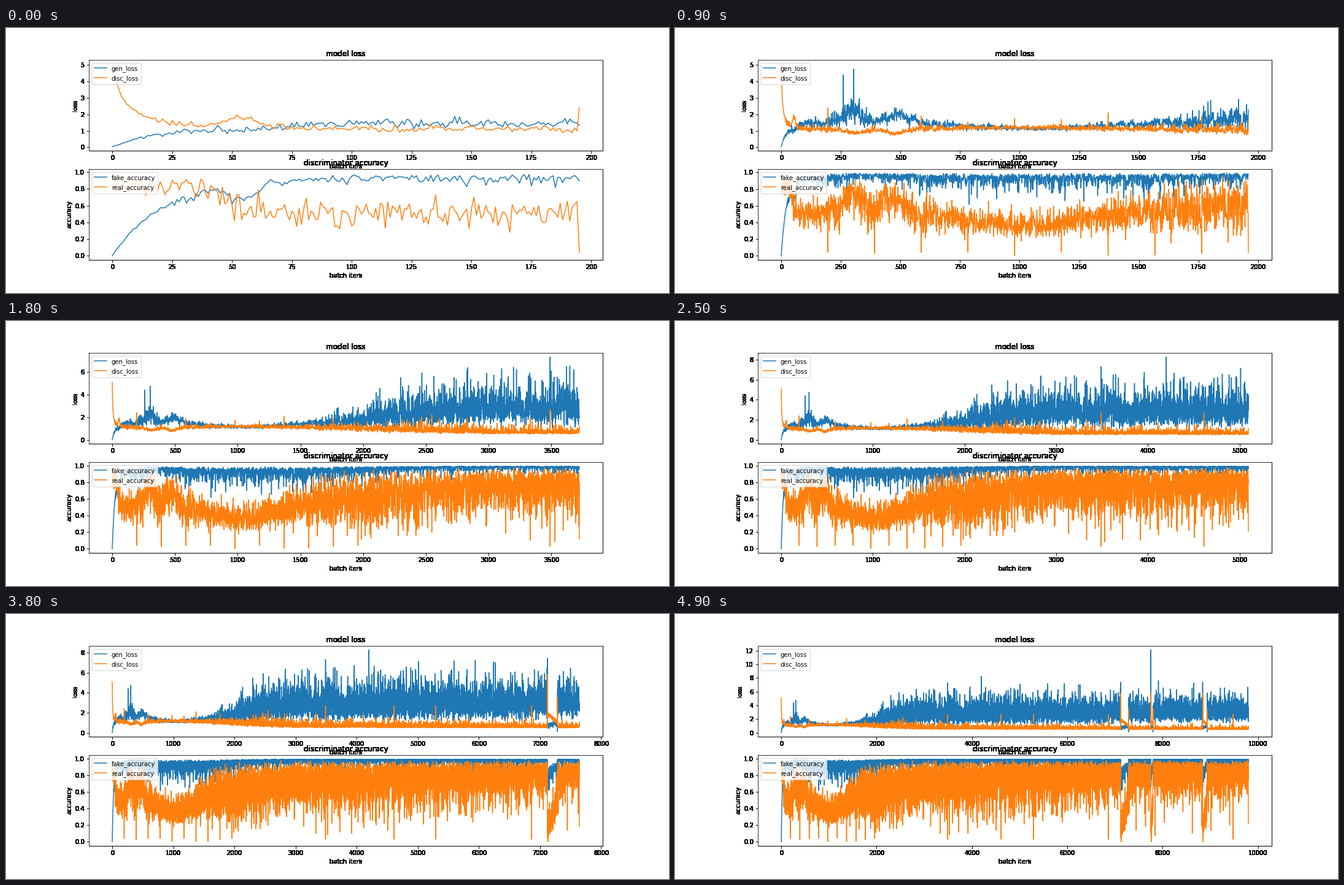
Write a matplotlib script that moves like this. It is 1080 by 432 pixels and loops after 5 s.

```python
import matplotlib.pyplot as plt
import numpy as np
from matplotlib.animation import FuncAnimation

EPOCH, EPOCHS = 196, 50
N = EPOCH * EPOCHS
x = np.arange(N)
rng = np.random.default_rng(12)


def bump(center, width):
    return np.exp(-((x - center) / width) ** 2)


def ramp(start, end):
    t = np.clip((x - start) / (end - start), 0, 1)
    return t * t * (3 - 2 * t)


def noise(size=N):
    return np.clip(rng.normal(size=size), -3, 3)


def logistic(v):
    return 1 / (1 + np.exp(-v))


def make_losses(drift):
    gen = (1.45 * (1 - np.exp(-(x + .8) / 28)) - .3 * bump(55, 12)
           + .65 * bump(300, 65) + .55 * bump(470, 50) + .2 * bump(570, 30)
           - .32 * bump(1060, 340) + 1.3 * ramp(1500, 3000) + .35 * ramp(3000, N))
    spread = (.1 + .08 * bump(290, 70) - .05 * bump(1050, 350)
              + .22 * ramp(1400, 2300) - .07 * ramp(4000, N))
    gen *= np.exp(.07 * drift + spread * noise())

    disc = (1.1 + 1.5 * np.exp(-x / 20) + 2.47 * np.exp(-x / 3.5) + .65 * bump(54, 9)
            - .22 * bump(320, 50) - .3 * bump(470, 45) + .1 * bump(1000, 350)
            - .4 * ramp(1400, 3500) - .1 * ramp(3500, N))
    spread = .15 - .07 * bump(1000, 350) + .4 * ramp(1400, 3000)
    spread *= 1 - np.exp(-x / 30)
    disc = .46 + (disc - .46) * np.exp(spread * noise() - .1 * drift)
    return gen, disc


def make_accuracies(drift):
    level = 2.6 + .7 * bump(380, 120) + 1.7 * ramp(1400, 3000)
    spread = .45 + .25 * ramp(100, 300) + .25 * ramp(1400, 3000)
    fake = logistic(level + .25 * drift + spread * noise())
    fake = fake * (1 - np.exp(-x / 22)) - (.15 + .06 * noise()) * bump(54, 8)

    level = (.1 + 1.5 * logistic((46 - x) / 3) + .95 * bump(310, 50) + .95 * bump(465, 50)
             - .65 * bump(1000, 340) + 1.05 * ramp(1300, 3000) + .6 * ramp(3000, N))
    spread = (.42 + .2 * bump(380, 150) - .08 * bump(1000, 300)
              + .4 * ramp(1300, 2000) - .12 * ramp(4000, N))
    real = logistic(level + .15 * drift + spread * noise())
    real[0] = .99
    return fake, real


# Slow wandering shared by all series
drift = np.convolve(noise(), np.hanning(24) / 3, "same")
drift *= ramp(80, 250) * (1 - .7 * bump(1050, 350))
gen, disc = make_losses(drift)
fake, real = make_accuracies(drift)

# The last, short batch of an epoch often fails
ends = x[EPOCH - 1::EPOCH]
early = ends < 2000
real[ends] = np.where(early, rng.uniform(0, .05, EPOCHS), rng.uniform(.05, .5, EPOCHS))
disc[ends] += rng.uniform(.3, .8, EPOCHS)
disc[ends[0]] = 2.4

# Collapses, each with a peak in loss and a slow recovery
for start, size, peak in (7120, 165, 7.4), (7753, 45, 12.1), (8840, 92, 7.4):
    part = slice(start, start + size)
    t = np.linspace(0, 1, size)
    wobble = noise(size)
    gen[part] = .75 + .3 * t + .12 * wobble
    disc[part] = 1.95 - .85 * t + .1 * wobble
    fake[part] = logistic(1.4 + 1.2 * t + .4 * wobble)
    real[part] = logistic(-1.9 + 1.9 * t - .5 * wobble)
    gen[start], disc[start + 4], real[start + 10] = peak, 5.8, 0
    disc[start + size], gen[start + size] = 3.5, .15

# Short setbacks
for i in (3490, 4610, 5290, 6860, 9478):
    disc[i], real[i] = 2.7, .03

for i, peak in (260, 4.4), (304, 4.75), (2468, 5.9), (3490, 7.3), (4200, 8.25):
    gen[i] = peak


def harden(img, dpi):
    """Turn soft glyph edges into solid black."""
    solid = np.zeros_like(img)
    solid[..., 3] = img[..., 3] > 0
    return solid, 0, 0


plt.rcParams.update({"font.family": "DejaVu Sans", "font.size": 10})
fig, axes = plt.subplots(2, figsize=(15, 6), dpi=72, facecolor="white")
fig.subplots_adjust(left=.125, right=.9, bottom=.125, top=.88, hspace=.2)

panels = [
    ("model loss", "loss", {"gen_loss": gen, "disc_loss": disc}),
    ("discriminator accuracy", "accuracy", {"fake_accuracy": fake, "real_accuracy": real}),
]
plots = []
for ax, (title, ylabel, data) in zip(axes, panels):
    ax.set(title=title, ylabel=ylabel, xlabel="batch iters")
    for name, series in data.items():
        plots.append((ax.plot([], [], label=name)[0], series))
    ax.legend(loc="upper left")
    ax.spines[["bottom", "right"]].set_linewidth(1)
    for part in ax.title, ax.xaxis, ax.yaxis:
        part.set_agg_filter(harden)


def update(epoch):
    n = EPOCH * (epoch + 1)
    for line, series in plots:
        line.set_data(x[:n], series[:n])
    for ax in axes:
        ax.relim()
        ax.autoscale_view()
    return [line for line, _ in plots]


anim = FuncAnimation(fig, update, frames=EPOCHS, interval=100, repeat=True, repeat_delay=0)
plt.show()
```
